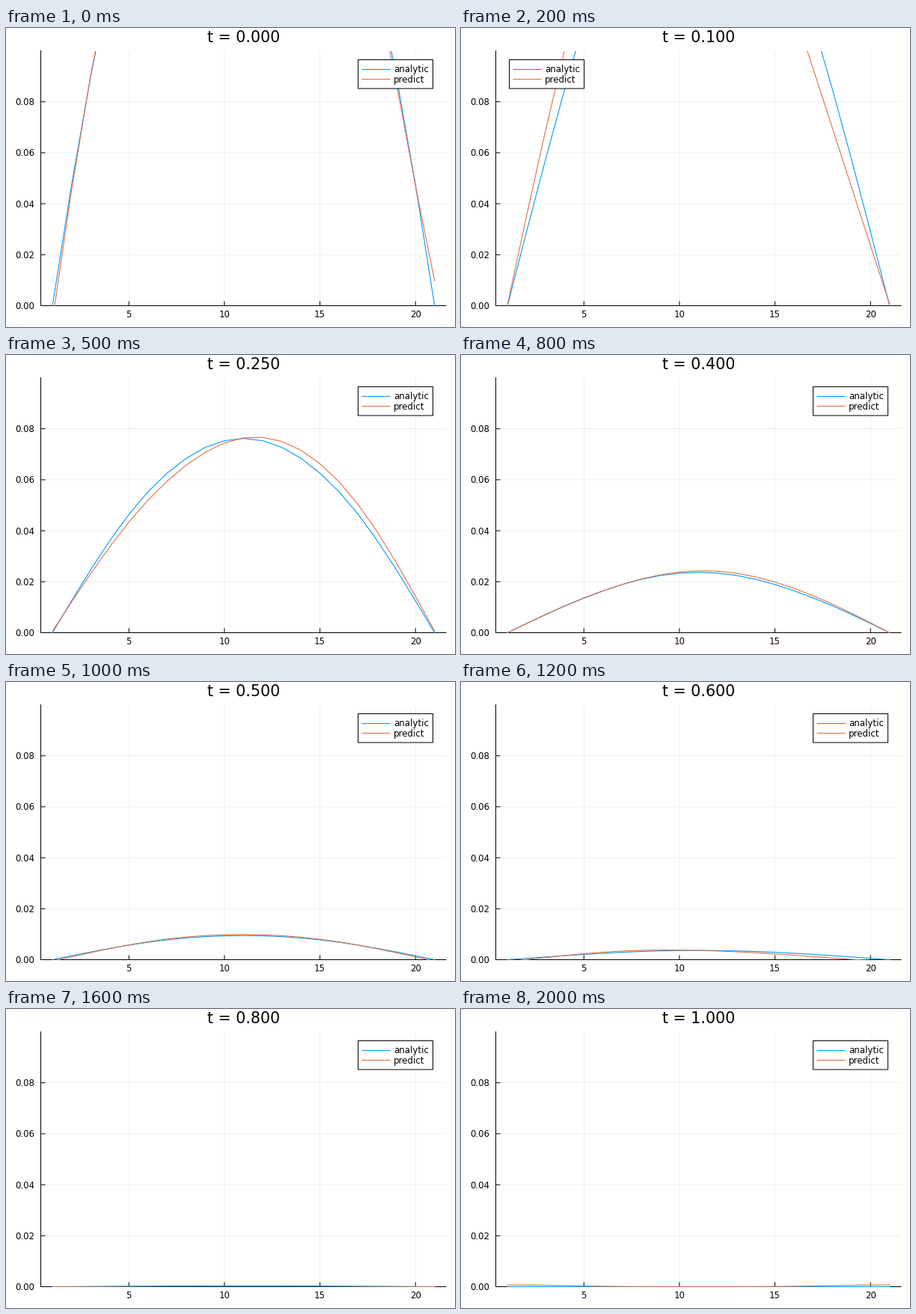
A matplotlib script for the animation above (2100 ms loop, 600 by 400 pixels).

```python
import numpy as np
import matplotlib.pyplot as plt
from matplotlib.animation import FuncAnimation
from matplotlib.patches import Rectangle

plt.rcParams.update({"font.family": "DejaVu Sans", "path.snap": False})

DPI = 100
PT = 72 / DPI                       # points per pixel
STEPS, INTERVAL = 21, 100
LEFT, RIGHT, TOP, BOTTOM = 46.5, 588, 30.5, 371.5
BLUE, ORANGE = "#009afa", "#e36f47"
SMALL, LARGE = 11.75 * PT, 20.6 * PT

nodes = np.arange(1, 22)
pos = (nodes - 1) / 20


def px(x):
    return 46.8 + (x - 0.4) * 25.53


def py(y):
    return BOTTOM - y * 3410


def analytic(t, c=3.0, damping=9.0):
    """Damped wave starting at rest from x(1 - x)."""
    u = np.zeros_like(pos)
    for n in range(1, 80, 2):
        k = n * np.pi
        w = np.sqrt((c * k) ** 2 - damping ** 2)
        decay = np.exp(-damping * t) * (np.cos(w * t) + damping / w * np.sin(w * t))
        u += 8 / k ** 3 * decay * np.sin(k * pos)
    return u


def predict(t):
    """Analytic curve plus a sideways swing, a slow drift and start-up edges."""
    swing = np.interp(t, [0, 0.1, 0.25, 0.4, 0.6, 0.8],
                      [45e-4, 190e-4, -36e-4, -5e-4, 6e-4, 0])
    phase = 2.5 * np.pi * t
    drift = 7 * np.sin(phase) * np.cos(np.pi * pos) ** 4
    drift -= 6 * np.cos(phase) * np.sin(np.pi * pos)
    edges = 98 * np.exp((pos - 1) / 0.022) - 57 * np.exp(-pos / 0.1)
    error = 1e-4 * (drift + edges * np.exp(-t / 0.02))
    return analytic(t) + swing * np.sin(2 * np.pi * pos) + error


fig = plt.figure(figsize=(6, 4), dpi=DPI, facecolor="white")
ax = fig.add_axes([0, 0, 1, 1])
ax.set_xlim(0, 600)
ax.set_ylim(400, 0)
ax.axis("off")


def line(xs, ys, color="black", width=1.0, z=2, **kw):
    return ax.plot(xs, ys, color=color, lw=width * PT, zorder=z, **kw)[0]


def label(x, y, s, size=SMALL, ha="center", z=3):
    return ax.text(x, y, s, size=size, ha=ha, va="baseline", zorder=z)


for v in (5, 10, 15, 20):
    x = px(v)
    line([x, x], [TOP, BOTTOM], width=0.6, z=1, alpha=0.1)
    line([x, x], [BOTTOM, BOTTOM - 5.5])
    label(x, 387.4, str(v))
for v in (0, 0.02, 0.04, 0.06, 0.08):
    y = py(v)
    line([LEFT, RIGHT], [y, y], width=0.6, z=1, alpha=0.1)
    line([LEFT, LEFT + 5.5], [y, y])
    label(38.6, y + 4.4, f"{v:.2f}", ha="right")
line([LEFT, LEFT], [TOP, BOTTOM])
line([LEFT, RIGHT], [BOTTOM, BOTTOM])

title = label(317.6, 19, "", LARGE)

window = Rectangle((LEFT, TOP), RIGHT - LEFT, BOTTOM + 0.5 - TOP,
                   transform=ax.transData)
curves = []
for color in (BLUE, ORANGE):
    curve = line([], [], color, 1.1, z=4)
    curve.set_clip_path(window)
    curves.append(curve)

box = ax.add_patch(Rectangle((0, 42.5), 100, 38.5, fc="white", ec="black",
                             lw=PT, zorder=5))
entries = []
for name, color, y in (("analytic", BLUE, 55.5), ("predict", ORANGE, 68.5)):
    entries.append((line([], [], color, 1.1, z=6), y,
                    label(0, y + 4, name, ha="left", z=6)))


def place_legend(values):
    """Use the top corner holding fewer points, the right one on a tie."""
    high = (values > 0.075) & (values < 0.1)
    crowd_left = high[:, nodes < 5.7].sum()
    crowd_right = high[:, nodes > 16.3].sum()
    x = 64.5 if crowd_left < crowd_right else 470.5
    box.set_x(x)
    for key, y, text in entries:
        key.set_data([x + 5.5, x + 42.5], [y, y])
        text.set_x(x + 47.6)


def update(i):
    t = i / (STEPS - 1)
    title.set_text(f"t = {t:.3f}")
    values = np.array([analytic(t), predict(t)])
    for curve, row in zip(curves, values):
        curve.set_data(px(nodes), py(row))
    place_legend(values)
    return []


anim = FuncAnimation(fig, update, frames=STEPS, interval=INTERVAL,
                     repeat=True, repeat_delay=0, blit=False)
plt.show()
```
